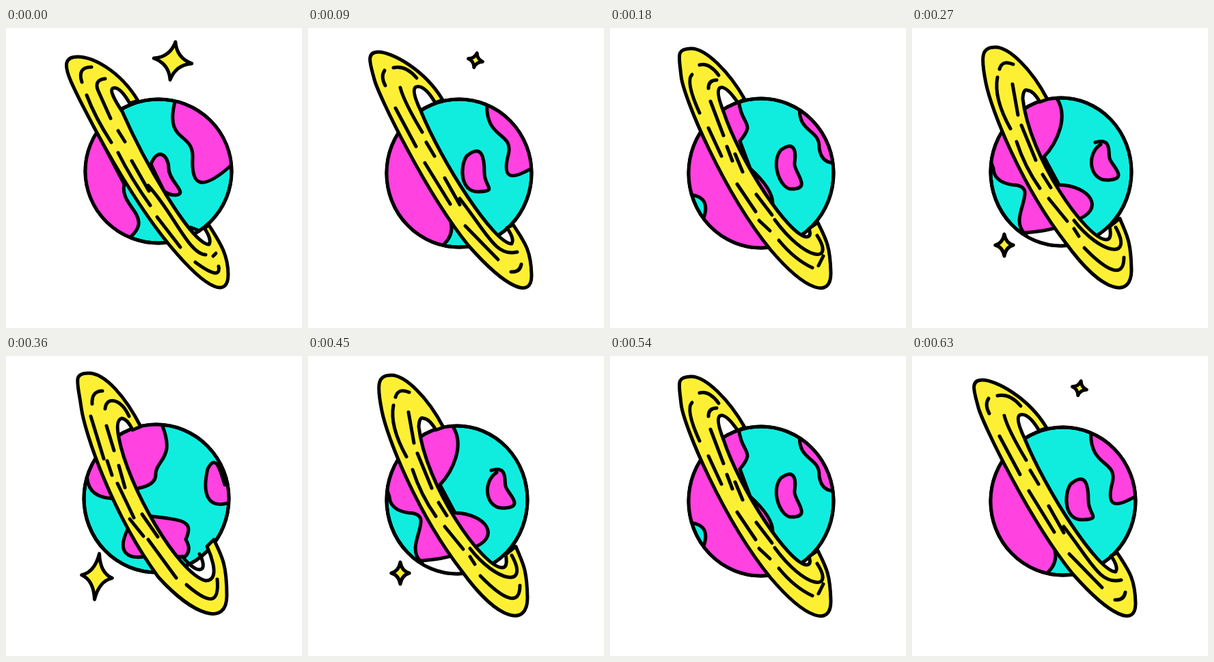
Write an HTML page without scripts that moves like this. It is 433x438 px and loops after 720 ms.

```html
<!DOCTYPE html>
<html lang="en">
<head>
<meta charset="utf-8">
<title>Ringed planet</title>
<style>
html, body { margin: 0; width: 100%; height: 100%; overflow: hidden; background: #fff; }
svg { display: block; width: 100%; height: 100%; overflow: hidden; }
.strip {
  fill: none; stroke: #000; stroke-width: 5;
  stroke-linecap: round; stroke-linejoin: round;
  animation: swing 720ms step-end infinite;
}
.sea { fill: #10eddf; }
.land { fill: #ff42e0; }
.ring, .star { fill: #fdf034; }
.gap { fill: #fff; }
#star { vector-effect: non-scaling-stroke; }
/* Five poses side by side, played there and back */
@keyframes swing {
  0%, 100% { transform: none; }
  12.5%, 87.5% { transform: translateX(-433px); }
  25%, 75% { transform: translateX(-866px); }
  37.5%, 62.5% { transform: translateX(-1299px); }
  50% { transform: translateX(-1732px); }
}
</style>
</head>
<body>
<svg viewBox="0 0 433 438">
<defs>
  <path id="star" d="M0-28Q5-5 28 0Q5 5 0 28Q-5 5-28 0Q-5-5 0-28Z"/>
  <clipPath id="clipA"><ellipse id="globeA" cx="223" cy="209" rx="107" ry="105"/></clipPath>
  <clipPath id="clipB"><ellipse id="globeB" cx="221" cy="212" rx="106" ry="108"/></clipPath>
  <clipPath id="clipC"><ellipse id="globeC" cx="221" cy="212" rx="106" ry="109"/></clipPath>
  <clipPath id="clipD"><ellipse id="globeD" cx="218" cy="210" rx="103" ry="108"/></clipPath>
  <clipPath id="clipE"><ellipse id="globeE" cx="220" cy="208" rx="106" ry="108"/></clipPath>
</defs>
<g class="strip">

<g>
  <use href="#globeA" class="sea"/>
  <g class="land" clip-path="url(#clipA)">
    <path d="M248 104C230 170 275 150 273 190S285 240 330 200V90Z"/>
    <path d="M132 150L90 220L120 310H176C222 276 165 262 173 228Z"/>
    <path d="M212 199C222 173 238 186 238 205S268 242 248 244Q238 244 231 238Z"/>
  </g>
  <use href="#globeA"/>
  <path class="ring" d="M193 106C165 60 125 42 105 42S85 55 95 78S172 236 240 318C300 390 325 390 325 360S312 312 297 288L290 292S302 308 297 316C270 315 200 190 170 122Q150 92 156 88Q166 84 181 110Z"/>
  <path d="M111 79Q104 57 125 57M145 74Q128 76 135 92L153 132M118 98Q130 130 154 167M164 150L174 166M164 182Q183 220 211 259M184 194L209 238M208 230C245 270 268 331 292 331M221 276L255 320M277 342Q315 370 311 348M303 333L307 329M270 291L283 296"/>
  <use href="#star" class="star" transform="translate(244 48) rotate(8)"/>
</g>

<g transform="translate(433)">
  <use href="#globeB" class="sea"/>
  <g class="land" clip-path="url(#clipB)">
    <path d="M262 105C257 165 302 150 293 185S295 225 335 200V100Z"/>
    <path d="M132 150L90 200L120 330H178Q218 310 208 280Z"/>
    <path d="M232 187C255 168 258 190 258 211S278 238 250 239S222 202 232 187Z"/>
  </g>
  <use href="#globeB"/>
  <path class="ring" d="M197 105C170 60 122 35 103 35S91 52 97 75S172 240 235 318C290 380 328 397 327 360S316 312 300 287L291 292S303 307 298 315C272 315 195 195 165 121Q150 90 158 86Q170 82 186 109Z"/>
  <path d="M113 84Q106 71 112 62M125 58Q143 54 159 73M135 87Q140 107 167 152M128 117L158 173M173 167L185 187M171 197L208 257M200 219L222 258M222 249C262 300 275 335 306 327M230 289L278 338M297 356Q310 357 312 345"/>
  <use href="#star" class="star" transform="translate(245 47) rotate(12) scale(.38)"/>
</g>

<g transform="translate(866)">
  <use href="#globeC" class="sea"/>
  <g class="land" clip-path="url(#clipC)">
    <path d="M150 110L188 100C190 145 215 135 190 165L205 205Q238 235 238 256V340H110L134 285Q152 246 115 243L90 180Z"/>
    <path d="M278 110C272 155 307 145 306 175Q309 198 330 197V110Z"/>
    <path d="M250 178C272 162 272 184 270 197S298 236 264 235C250 234 234 198 250 178Z"/>
  </g>
  <use href="#globeC"/>
  <path class="ring" d="M197 104C175 65 140 29 118 30S101 40 104 70S165 238 235 324C288 386 324 395 323 357S317 310 304 284L291 293S296 304 288 305C262 304 190 195 166 122Q154 92 161 87Q170 84 187 109Z"/>
  <path d="M120 68Q110 78 131 124M131 54Q145 50 159 69M144 88Q144 76 156 76M147 107L166 157M144 146L163 187M171 173L179 194M183 184L194 210M186 228L213 268M214 243L237 273M241 280C285 340 330 345 303 303M218 281L234 296M247 310Q270 338 296 350M305 347L312 333"/>
</g>

<g transform="translate(1299)">
  <use href="#globeD" class="sea"/>
  <g class="land" clip-path="url(#clipD)">
    <path class="gap" d="M165 299L215 290L230 325H180Z"/>
    <path d="M150 110L210 100C232 130 210 170 193 188L215 229C260 230 285 265 239 281Q210 296 164 299C140 275 190 230 147 229Q120 225 119 205L110 180Z"/>
    <path d="M268 167C292 160 287 180 289 190S318 220 288 222S255 183 276 170"/>
  </g>
  <use href="#globeD"/>
  <path class="ring" d="M198 104C175 60 142 28 122 28S100 40 108 80S160 230 225 314C280 390 322 395 321 352S314 303 304 278L289 290S294 309 284 309C255 308 172 190 162 103Q163 88 169 91Q178 92 187 108Z"/>
  <path d="M128 60Q132 46 148 53M125 72Q119 102 144 147M147 82L155 127M160 142L181 193M153 166Q165 203 187 234M191 214L203 233M200 249L227 282M237 281C275 330 325 340 298 291M237 293L244 304M252 321C288 358 310 365 310 335"/>
  <use href="#star" class="star" transform="translate(135 317) scale(.47 .57)"/>
</g>

<g transform="translate(1732)">
  <use href="#globeE" class="sea"/>
  <g class="land" clip-path="url(#clipE)">
    <path d="M150 110L226 95C250 150 220 150 219 172Q220 188 194 193L155 208Q122 206 119 180L110 150Z"/>
    <path d="M178 253C160 290 182 296 202 293H262Q272 283 263 268C275 240 260 240 213 234Z"/>
    <path d="M295 165C308 140 314 170 320 188H335V211C290 230 288 195 295 165Z"/>
  </g>
  <use href="#globeE"/>
  <path class="ring" d="M197 103C175 60 145 25 121 25S105 38 110 75S155 230 223 323C275 380 323 395 323 350S316 292 304 268L294 278S318 328 292 328C252 318 178 190 165 119Q160 94 169 91Q178 92 185 108Z"/>
  <path d="M283 289C297 315 282 322 258 293M126 70Q125 51 141 51M145 77C147 58 168 62 180 88M124 88L143 150M147 102L158 138M148 153L155 174M165 160L174 192M163 186L187 236M199 231L222 264M181 238L201 263M208 268L249 324M264 334C300 365 312 360 309 326"/>
  <use href="#star" class="star" transform="translate(133 322) rotate(6) scale(.8 1.2)"/>
</g>

</g>
</svg>
</body>
</html>
```
